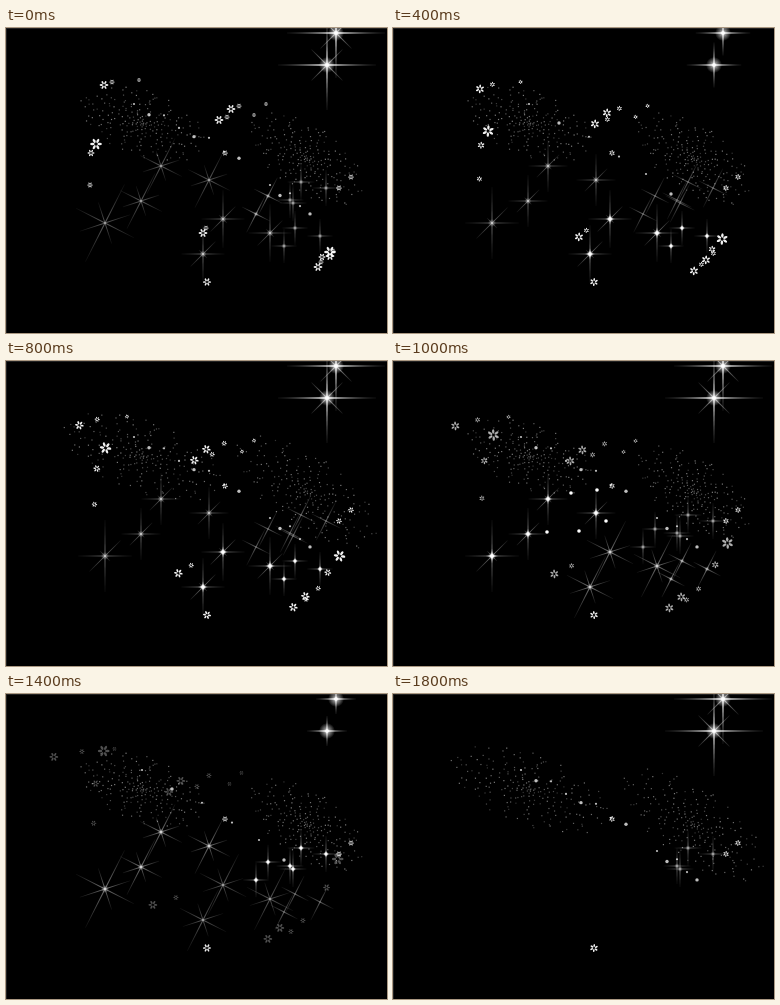
Write an HTML page with a canvas that moves like this. It is 381 px wide and 305 px high and loops after 2000 ms.

```html
<!DOCTYPE html>
<html lang="en">
<head>
<meta charset="utf-8">
<title>Night sparkle</title>
<style>
html, body { margin: 0; width: 100%; height: 100%; overflow: hidden; background: #000; }
canvas { display: block; width: 381px; height: 305px; }
</style>
</head>
<body>
<canvas id="sky" width="381" height="305"></canvas>
<script>
const ctx = document.getElementById('sky').getContext('2d');
const W = 381, H = 305, STEP = 200, STEPS = 10, TAU = Math.PI * 2;

// One digit per step
const flare = '4412442044';
const wide = '0001100011';
const late = '0011001100';
const twinkle = '0112123300';

// Star groups run through the same four phases with a shift
const stars = [
  { shift: 0, size: 0.72, at: [[155, 138], [203, 152], [135, 173]] },
  { shift: 0, size: 1, at: [[99, 195]] },
  { shift: 1, size: 0.8, at: [[217, 191], [264, 205], [197, 226]] },
  { shift: 1, size: 0.47, at: [[289, 200], [278, 218], [314, 208]] },
  { shift: 3, size: 0.48, at: [[262, 168], [250, 186]] },
  { shift: 3, size: 0.5, at: [[295, 154], [284, 172], [287, 175], [320, 160]], lasting: true }
];

// Each spray repeats one set of blossoms [dx, dy, radius, drift] at its origins
const sprays = [
  { at: [[98, 57], [225, 81], [213, 92]], set: [[0, 0, 4.5, 1], [8, -3, 2.7, 0.6], [35, -5, 2.2, 0.49]] },
  { at: [[197, 205], [312, 239], [324, 228]], set: [[0, 0, 4.5, 1], [3, -5, 2.7, 0.6]] },
  { at: [[90, 116]], set: [[0, 0, 6, 1], [-5, 9, 3.6, 0.6], [-6, 41, 2.8, 0.47]], up: true },
  { at: [[324, 224]], set: [[0, 0, 6, 1], [-8, 5, 3.6, 0.6]], up: true }
];
const travel = [0, 6, 13, 22, 29, 42, 50, 59, 70];
const still = [[219, 125, 3], [345, 149, 3], [333, 160, 3], [201, 254, 4.2]];
const pearls = [[178, 132], [204, 129], [213, 160], [186, 170], [154, 171]];

const white = a => `rgba(255,255,255,${a})`;

function random(seed) {
  return () => (seed = (seed * 16807) % 2147483647) / 2147483647;
}

// Tilted spiral of specks, densest in the middle
function cloud(x, y, a, b, tilt, seed) {
  const rnd = random(seed), c = Math.cos(tilt), s = Math.sin(tilt), count = 210;
  return Array.from({ length: count }, (_, i) => {
    const r = Math.pow((i + 0.5) / count, 0.8);
    const t = i * 2.39996 + rnd() * 0.4;
    const u = a * r * Math.cos(t), v = b * r * Math.sin(t);
    return [x + u * c - v * s, y + u * s + v * c, 0.2 + rnd() * 0.3];
  });
}

const dust = [[66, 33], [84, 36]].map(([a, b]) =>
  [...cloud(136, 95, a, b, 0.36, 11), ...cloud(300, 130, a, b, 0.62, 23)]);

function dot(x, y, r, a = 1) {
  ctx.fillStyle = white(a);
  ctx.beginPath();
  ctx.arc(x, y, r, 0, TAU);
  ctx.fill();
}

// Evenly spaced dots between two points, swaying to both sides
function trail(x0, y0, x1, y1, count, sway) {
  for (let i = 0; i < count; i++) {
    const t = i / (count - 1);
    dot(x0 + (x1 - x0) * t, y0 + (y1 - y0) * t + sway * Math.sin(i * 2.2), i % 3 === 1 ? 1.7 : 1.1, 0.75);
  }
}

function glow(x, y, r, a) {
  const g = ctx.createRadialGradient(x, y, 0, x, y, r);
  g.addColorStop(0, white(a));
  g.addColorStop(0.4, white(a * 0.5));
  g.addColorStop(1, white(0));
  ctx.fillStyle = g;
  ctx.fillRect(x - r, y - r, 2 * r, 2 * r);
}

// Line through the centre, fading and tapering to both ends
function ray(x, y, angle, len, width, a) {
  ctx.save();
  ctx.translate(x, y);
  ctx.rotate(angle);
  const g = ctx.createLinearGradient(-len, 0, len, 0);
  g.addColorStop(0, white(a * 0.15));
  g.addColorStop(0.5, white(a));
  g.addColorStop(1, white(a * 0.15));
  ctx.fillStyle = g;
  ctx.beginPath();
  ctx.moveTo(-len, -0.3);
  ctx.lineTo(0, -width / 2);
  ctx.lineTo(len, -0.3);
  ctx.lineTo(len, 0.3);
  ctx.lineTo(0, width / 2);
  ctx.lineTo(-len, 0.3);
  ctx.fill();
  ctx.restore();
}

function cross(x, y, turn, h, v, width, a) {
  ray(x, y, turn, h, width, a);
  ray(x, y, turn + Math.PI / 2, v, width, a);
}

// Phases: 0 faint turned, 1 grey upright, 2 bright upright, 3 turned with core
function star(x, y, s, phase) {
  const turned = phase % 3 === 0;
  const turn = turned ? 0.47 : 0, k = turned ? s * 1.2 : s;
  const a = [0.36, 0.42, 0.5, 0.45][phase];
  cross(x, y, turn, 27 * k, 36 * k, 1.1, a);
  if (s > 0.6) cross(x, y, turn + Math.PI / 4, (turned ? 18 : 7) * k, 22 * k, 0.9, a);
  if (phase) glow(x, y, 1.5 + 2.5 * s, phase === 2 ? 0.9 : 0.55);
  if (phase === 2) {
    cross(x, y, 0, 6 * s, 7 * s, 2.4, 1);
    dot(x, y, 0.7 + 1.1 * s);
  }
}

function drawStars(n) {
  const fade = Math.min(1, (9 - n) / 2);
  for (const { shift, size, at, lasting } of stars) {
    let phase = (+twinkle[n] + shift) % 4;
    if (lasting && phase === 3) phase = 1;
    ctx.globalAlpha = lasting ? 1 : fade;
    at.forEach(([x, y]) => star(x, y, size, phase));
  }
  ctx.globalAlpha = 1;
}

function bigStar(x, y, level) {
  cross(x, y, 0, 20 + 29 * level, 15 + 30 * level, 1.8, 0.8);
  cross(x, y, Math.PI / 4, 22 * level, 22 * level, 1.2, 0.6 * level);
  glow(x, y, 8, 0.95);
  dot(x, y, 1.8);
}

function flower(x, y, r, turn, a) {
  ctx.save();
  ctx.translate(x, y);
  ctx.rotate(turn);
  ctx.fillStyle = white(a);
  for (let i = 0; i < 6; i++) {
    ctx.beginPath();
    ctx.ellipse(r * 0.6, 0, r * 0.38, r * 0.2, 0, 0, TAU);
    ctx.fill();
    ctx.rotate(TAU / 6);
  }
  ctx.restore();
}

// Flowers drift left or up along a shallow arc while fading out
function drawFlowers(n) {
  still.forEach(([x, y, r]) => flower(x, y, r, 0.3 * n, 0.95));
  if (n >= travel.length) return;
  const p = travel[n], bow = Math.sin(p / 80 * Math.PI);
  const a = n < 5 ? 0.95 : Math.pow(0.68, n - 4);
  for (const { at, set, up } of sprays) {
    const [mx, my] = up ? [10.5 * bow, -p] : [-0.85 * p, 8 * bow];
    for (const [x, y] of at) {
      for (const [dx, dy, r, k] of set) flower(x + dx + mx * k, y + dy + my * k, r, 0.3 * n, a);
    }
  }
}

function drawDots(n) {
  for (const [x, y, a] of dust[wide[n]]) {
    ctx.fillStyle = white(a);
    ctx.fillRect(x, y, 1.2, 1.2);
  }
  if (+late[n]) {
    trail(136, 76, 226, 128, 4, 2);
    trail(253, 146, 278, 166, 2, 0);
  } else {
    trail(128, 76, 233, 129, 8, 4);
    trail(264, 157, 304, 183, 5, 5);
  }
  if (twinkle[n] === '2') pearls.forEach(([x, y]) => dot(x, y, 1.8));
}

function draw(n) {
  ctx.fillStyle = '#000';
  ctx.fillRect(0, 0, W, H);
  ctx.fillStyle = '#222';
  ctx.fillRect(0, 0, W, 1);
  ctx.fillRect(0, 0, 1, H);
  drawDots(n);
  drawStars(n);
  bigStar(330, 5, flare[n] / 4);
  bigStar(321, 37, flare[n] / 4);
  drawFlowers(n);
}

const start = performance.now();
let shown = -1;
function tick() {
  const n = Math.floor((performance.now() - start) / STEP) % STEPS;
  if (n !== shown) draw(shown = n);
  requestAnimationFrame(tick);
}
tick();
</script>
</body>
</html>
```
